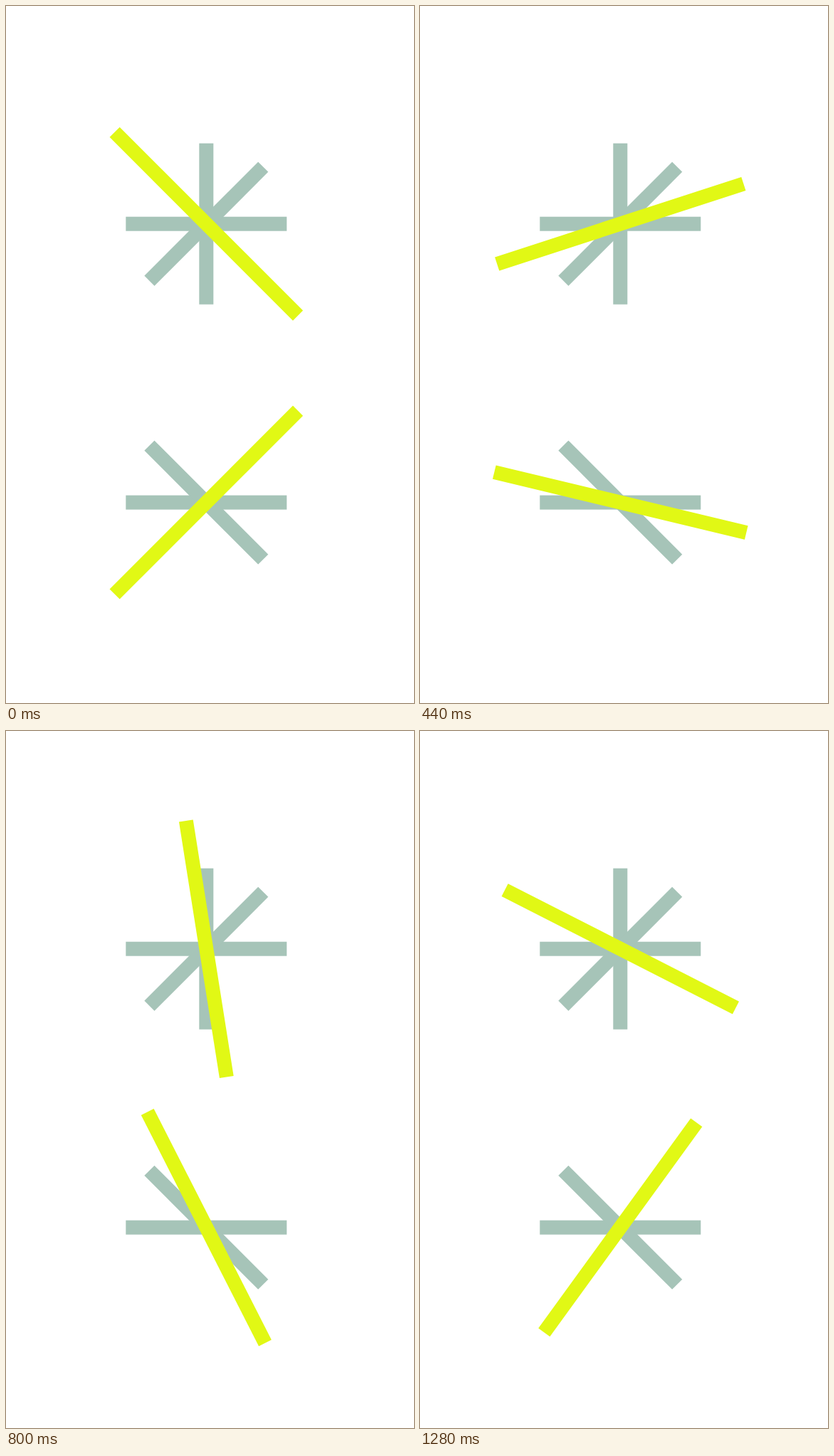
Recreate the animation shown at these times as an HTML page. Size 573x978 px, loop 1.32 s.

```html
<!DOCTYPE html>
<html lang="en">
<head>
<meta charset="utf-8">
<title>Spinning bars</title>
<style>
  html, body { margin: 0; width: 100%; height: 100%; overflow: hidden; background: #fff; }
  svg { display: block; width: 100%; height: 100%; }
  .still { fill: #a6c4b8; }
  .spin { fill: #e1f815; }
</style>
</head>
<body>
<svg viewBox="0 0 573 978">
  <defs>
    <rect id="short" x="-113" y="-10" width="226" height="20"/>
    <rect id="long" x="-182" y="-10" width="364" height="20"/>
  </defs>
  <g transform="translate(281.3 305.7)">
    <g class="still">
      <use href="#short"/>
      <use href="#short" transform="rotate(90)"/>
      <use href="#short" transform="rotate(-45)"/>
    </g>
    <use id="top" class="spin" href="#long" transform="rotate(45)"/>
  </g>
  <g transform="translate(281.3 696.6)">
    <g class="still">
      <use href="#short"/>
      <use href="#short" transform="rotate(45)"/>
    </g>
    <use id="bottom" class="spin" href="#long" transform="rotate(-45)"/>
  </g>
</svg>
<script>
  const LOOP = 1320, STEP = 40;
  const TURN = 80; // ticks per full turn of the top bar, 60 ticks per second
  const top_ = document.getElementById('top');
  const bottom = document.getElementById('bottom');

  const rotate = (bar, deg) => bar.setAttribute('transform', `rotate(${deg})`);

  function draw() {
    const step = Math.floor((performance.now() % LOOP) / STEP);
    const tick = Math.floor(step * STEP * 60 / 1000);
    rotate(top_, 45 + 360 * tick / TURN);
    rotate(bottom, -45 + 180 * tick / TURN);
    requestAnimationFrame(draw);
  }
  draw();
</script>
</body>
</html>
```
